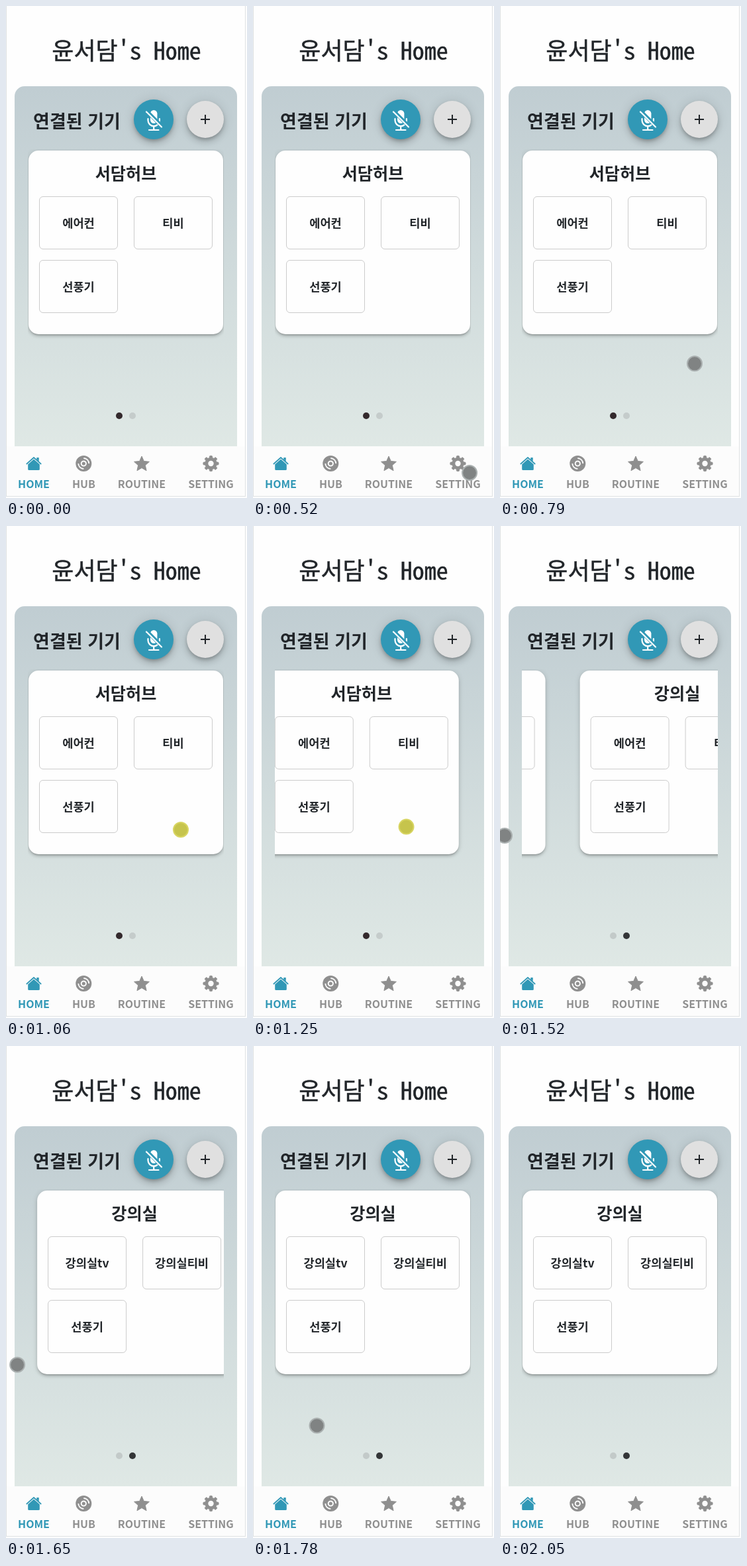
Animation of 364 by 742 pixels, one loop 3310 ms. Source, as an HTML page:

```html
<!DOCTYPE html>
<html lang="ko">
<head>
<meta charset="utf-8">
<style>
html, body { margin: 0; width: 364px; height: 742px; overflow: hidden; background: #fdfdfd; }
body { position: relative; color: #212529; font-family: "Noto Sans CJK KR", "Noto Sans KR", "Noto Sans CJK", "Noto Sans", sans-serif; }
div, span, svg { position: absolute; box-sizing: border-box; }
.t { white-space: pre; transform: translate(-50%, -50%); line-height: 1; }
#page { left: 0; top: 0; width: 362px; height: 740px; background: #fefefe; border: solid #dfe2e3; border-width: 0 1px 1px; }
#title { left: 182px; top: 65px; font: 36px/1 "Noto Sans Mono CJK KR", "Noto Sans Mono", monospace; -webkit-text-stroke: .5px; }
#panel { left: 13px; top: 121px; width: 336px; height: 543px; border-radius: 15px 15px 0 0; background: linear-gradient(#c0cdd2, #dfe8e5); }
#head { left: 107px; top: 171.5px; font-size: 27px; font-weight: 700; }
.fab { border-radius: 50%; box-shadow: 0 3px 5px -1px rgba(0,0,0,.2), 0 6px 10px rgba(0,0,0,.14), 0 1px 18px rgba(0,0,0,.12); }
#slider { left: 33px; top: 216px; width: 296px; height: 288px; overflow: hidden; }
.card { left: 1px; top: 2px; width: 294px; height: 277px; border-radius: 15px; background: #fefefe; box-shadow: 0 3px 3px -2px rgba(0,0,0,.2), 0 3px 4px rgba(0,0,0,.14), 0 1px 8px rgba(0,0,0,.12); }
.card h3 { position: absolute; margin: 0; left: 147px; top: 34px; font-size: 25.2px; font-weight: 700; }
.box { width: 119px; height: 80px; border: 1px solid #ccc; border-radius: 6px; }
.box .t { left: 58.5px; top: 38.5px; font-size: 17.6px; font-weight: 700; }
.dot { top: 613px; width: 10px; height: 10px; border-radius: 50%; }
#nav { left: 1px; top: 664px; width: 360px; height: 75px; background: #fcfcfc; }
.label { top: 720px; font-size: 16px; font-weight: 700; color: #8f8f8f; }
svg { left: 0; top: 0; }
#ptr { left: -12px; top: -12px; width: 24px; height: 24px; border-radius: 50%; border: 2px solid; }
</style>
</head>
<body>
<div id="page"></div>
<div id="title" class="t">윤서담's Home</div>
<div id="panel"></div>
<span id="head" class="t">연결된 기기</span>
<div class="fab" style="left:193px;top:141px;width:60px;height:60px;background:#3198b6"></div>
<div class="fab" style="left:273px;top:143px;width:56px;height:56px;background:#e0e0e0"></div>
<div id="slider"></div>
<div class="dot" style="left:166px"></div>
<div class="dot" style="left:186px"></div>
<div id="nav"></div>
<svg width="364" height="742" fill="none">
  <g stroke="#fff" stroke-width="2.2" stroke-linecap="round">
    <rect x="218" y="157" width="10.4" height="20" rx="5.2" fill="#fff" stroke="none"/>
    <path d="M214.5 170v2.5a8.7 8.7 0 0 0 17.4 0V170M223.2 181.5V187M216 187h14.5"/>
    <path d="M212.5 158.5L236 182" stroke="#3198b6" stroke-width="5.5"/>
    <path d="M212 159.5L235 182.5"/>
  </g>
  <path d="M301 164v14M294 171h14" stroke="#212529" stroke-width="2"/>
  <g fill="#3198b6">
    <path d="M42 683.5l8.8 7.8V698.5q0 1.5-1.5 1.5H34.7q-1.5 0-1.5-1.5V691.3z"/>
    <path d="M46.3 681h3.4v6l-3.4-3z"/>
    <path d="M31.3 690.5L42 681l10.7 9.5" fill="none" stroke="#3198b6" stroke-width="1.7" stroke-linecap="round" stroke-linejoin="round"/>
  </g>
  <g stroke="#fcfcfc" stroke-width="1.8">
    <circle cx="117.3" cy="690" r="12" fill="#8f8f8f" stroke="none"/>
    <circle cx="117.3" cy="690" r="3.6" stroke-width="2"/>
    <path d="M117.3 682a8 8 0 0 1 8 8M117.3 698a8 8 0 0 1-8-8"/>
  </g>
  <g fill="#8f8f8f" stroke="#8f8f8f" stroke-linejoin="round">
    <path id="star"/>
    <path id="gear"/>
  </g>
  <circle cx="309.5" cy="690" r="4.2" fill="#fcfcfc"/>
</svg>
<span class="label t" style="left:42px;color:#3198b6">HOME</span>
<span class="label t" style="left:117.5px">HUB</span>
<span class="label t" style="left:205px">ROUTINE</span>
<span class="label t" style="left:309.5px">SETTING</span>
<div id="ptr"></div>
<script>
const $ = id => document.getElementById(id);
const LOOP = 3310, STEP = 66.4;
const PITCH = 346;                            // distance between cards
const SHOW = 3, PRESS = 16, RELEASE = 22, HIDE = 31; // in steps

function addCard(title, names) {
  const card = document.createElement('div');
  card.className = 'card';
  card.innerHTML = `<h3 class="t">${title}</h3>` + names.map((n, i) =>
    `<div class="box" style="left:${16 + i % 2 * 143}px;top:${69 + (i >> 1) * 96}px"><span class="t">${n}</span></div>`).join('');
  $('slider').append(card);
  return card;
}

// closed outline, radius given by a function of the angle
function polar(id, cx, cy, n, radius) {
  const pts = Array.from({ length: n }, (_, i) => {
    const a = i / n * 2 * Math.PI, r = radius(i, a);
    return (cx + r * Math.sin(a)).toFixed(2) + ' ' + (cy - r * Math.cos(a)).toFixed(2);
  });
  $(id).setAttribute('d', 'M' + pts.join('L') + 'Z');
}
polar('star', 205, 691, 10, i => i % 2 ? 5.6 : 12);
polar('gear', 309.5, 690, 160, (i, a) => 10.2 + 1.4 * Math.tanh(4 * Math.cos(8 * a)));

const first = addCard('서담허브', ['에어컨', '티비', '선풍기']);
const second = addCard('강의실', ['에어컨', '티비', '선풍기']);
const labels = second.querySelectorAll('.box .t');
const dots = document.querySelectorAll('.dot');

// pointer strokes: first and last step, end point, sideways bow
const strokes = [
  { from: 3, to: 5, x: 328, y: 715, bx: 0, by: 0 },
  { from: 7, to: 15, x: 264, y: 458, bx: 45, by: 0 },
  { from: 18, to: 22.5, x: 7, y: 467, bx: 0, by: -50 },
  { from: 24, to: 30, x: 236, y: 708, bx: -100, by: -60 }
];

function pointer(k) {
  let x = 328, y = 738;
  for (const s of strokes) {
    const u = Math.min(1, Math.max(0, (k - s.from) / (s.to - s.from)));
    const f = u * u * (3 - 2 * u), bow = f * (1 - f);
    x += (s.x - x) * f + s.bx * bow;
    y += (s.y - y) * f + s.by * bow;
  }
  return [x, y];
}

// the card trails the finger, then settles after release
function offset(k) {
  const drag = Math.max(0, .9 * (264 - pointer(Math.min(k, RELEASE))[0]) - 12);
  const rest = Math.max(0, 1 - Math.max(0, k - RELEASE) / 3.7) ** 1.4;
  return k < PRESS ? 0 : PITCH - (PITCH - drag) * rest;
}

function draw(t) {
  const k = Math.floor((t + 14) / STEP);
  const [x, y] = pointer(k), off = offset(k);
  const down = k >= PRESS && k <= RELEASE, next = k > RELEASE, named = k > RELEASE + 1;
  first.style.transform = `translateX(${-off}px)`;
  second.style.transform = `translateX(${PITCH - off}px)`;
  labels[0].textContent = named ? '강의실tv' : '에어컨';
  labels[1].textContent = named ? '강의실티비' : '티비';
  dots[0].style.background = next ? '#c3cac9' : '#33292c';
  dots[1].style.background = next ? '#333537' : '#c5cccb';
  const p = $('ptr').style;
  p.display = k >= SHOW && k < HIDE ? 'block' : 'none';
  p.transform = `translate(${x}px,${y}px)`;
  p.background = down ? '#c6c44c' : '#808383';
  p.borderColor = down ? '#d8d562' : '#aab0b0';
}

const start = performance.now();
function tick(now) {
  draw(Math.max(0, now - start) % LOOP);
  requestAnimationFrame(tick);
}
draw(0);
requestAnimationFrame(tick);
</script>
</body>
</html>
```
